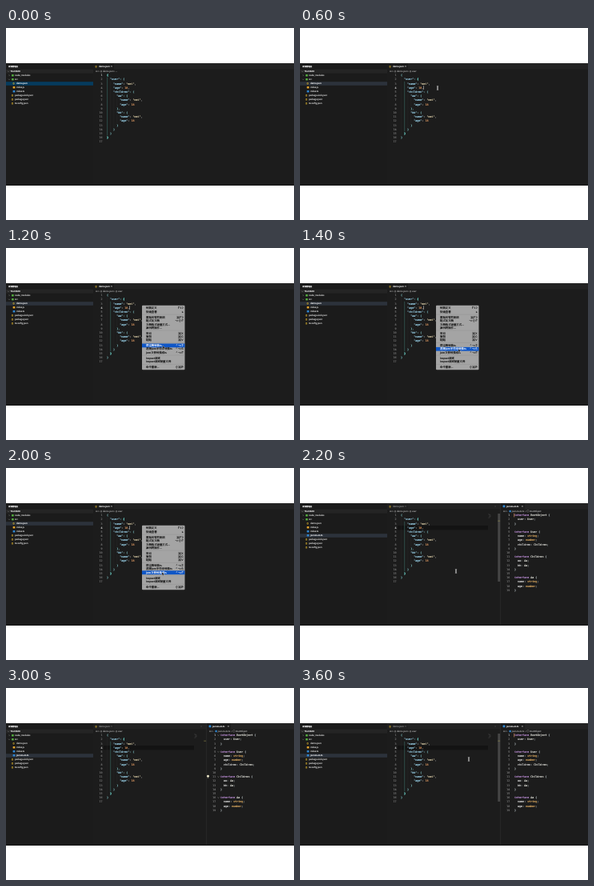
Write an HTML page that moves like this. It is 360 px wide and 240 px high and loops after 3.8 s.

```html
<!DOCTYPE html>
<html lang="zh">
<head>
<meta charset="utf-8">
<title>JSON to TS</title>
<style>
html, body { margin: 0; width: 100%; height: 100%; overflow: hidden; background: #fff; }
svg { display: block; width: 100vw; height: 100vh; }
text { white-space: pre; text-rendering: geometricPrecision; }
text, tspan { fill: currentColor; stroke: currentColor; stroke-width: .12; }
.code { font: 3.37px "DejaVu Sans Mono", monospace; }
.ui { font: 2.8px "Open Sans", "Noto Sans CJK SC", "Noto Sans CJK", sans-serif; }
.head { font: 700 2.4px "Noto Sans CJK SC", "Noto Sans CJK", sans-serif; }
.menu { font: 3.4px "Liberation Sans", "Noto Sans CJK SC", "Noto Sans CJK", "DejaVu Sans", sans-serif; }
.keys { letter-spacing: .4px; }
.bold { font-weight: 700; }
</style>
</head>
<body>
<svg id="stage" viewBox="0 0 360 240"></svg>
<script>
const STEP = 200, LOOP = 3800;
const CHAR = 2.03, ROW = 5.2, TOP = 59;
const TEAL = '#5fd6c4';
const stage = document.getElementById('stage');

const json = `{
  "user": {
    "name": "mei",
    "age": 18,
    "children": {
      "aa": {
        "name": "mei",
        "age": 18
      },
      "bb": {
        "name": "mei",
        "age": 18
      }
    }
  }
}
`.split('\n');

const types = `interface RootObject {
  user: User;
}

interface User {
  name: string;
  age: number;
  children: Children;
}

interface Children {
  aa: Aa;
  bb: Aa;
}

interface Aa {
  name: string;
  age: number;
}`.split('\n');

// label, vertical centre, shortcut
const menuItems = [
  ['转到定义', 75.3, 'F12'],
  ['快速查看', 79.8, '▸'],
  ['更改所有匹配项', 86.6, '⌘F2'],
  ['格式化文档', 91, '⌥⇧F'],
  ['文档格式设置方式...', 95.4],
  ['源代码操作...', 99.8],
  ['剪切', 106.4, '⌘X'],
  ['复制', 110.8, '⌘C'],
  ['粘贴', 115.2, '⌘V'],
  ['将注释转换ts', 121.9, '⌃⌥Z'],
  ['选择json字符串转换ts', 126.3, '⌃⌥S'],
  ['json文件转换成ts', 130.7, '⌃⌥F'],
  ['Inspect调试', 137.6],
  ['Inspect调试配置文件', 142],
  ['命令面板...', 148.8, '⇧⌘P']
];
const menuLines = [83.2, 103.1, 118.5, 134.1, 145.4];
const menuPick = { 5: 3, 6: 9, 7: 10, 8: 10, 9: 11, 10: 11 };

const pointer = {
  1: [163, 100], 2: [172, 85], 3: [172, 75],
  5: [188, 92], 6: [196, 122], 7: [198, 126], 8: [198, 127], 9: [196, 130], 10: [195, 130],
  11: [195, 129], 12: [222, 125], 13: [252, 118], 14: [284, 113],
  16: [264, 101], 17: [234, 91], 18: [211, 89]
};

const esc = s => s.replace(/&/g, '&amp;').replace(/</g, '&lt;');
const rect = (x, y, w, h, fill, more = '') =>
  `<rect x="${x}" y="${y}" width="${w}" height="${h}" fill="${fill}" ${more}/>`;
const text = (x, y, s, color, cls = 'ui', anchor = 'start') =>
  `<text x="${x}" y="${y + 1.15}" color="${color}" class="${cls}" text-anchor="${anchor}">${s}</text>`;
const label = (x, y, s, color, cls) => text(x, y, esc(s), color, cls);
const line = (d, color, w = .5) =>
  `<path d="${d}" fill="none" stroke="${color}" stroke-width="${w}"/>`;
const rowY = n => TOP + (n - 1) * ROW;

const jsonColor = (t, rest) =>
  t[0] === '"' ? (rest[0] === ':' ? '#a4e0fa' : '#e2d3ac')
  : /\d/.test(t) ? '#f2a468'
  : /[{}]/.test(t) ? '#8fdde0' : '#d4d4d4';

const typeColor = (t, rest) =>
  t === 'interface' ? '#c795e2'
  : /^(string|number)$/.test(t) ? '#efb868'
  : /^[A-Z]/.test(t) ? '#ecece4'
  : rest[0] === ':' ? '#e0e0e0' : '#ccd6da';

function codeBlock(lines, x, numX, color, active) {
  return lines.map((src, i) => {
    const body = src.trimStart(), y = rowY(i + 1);
    const spans = body.replace(/"[^"]*"|\w+|[^"\w]+/g, (t, at) =>
      `<tspan color="${color(t, body.slice(at + t.length))}">${t}</tspan>`);
    return text(numX, y, i + 1, i + 1 === active ? '#c6c6c6' : '#7c7c7c', 'code', 'end') +
      text(x + (src.length - body.length) * CHAR, y, spans, '#ccc', 'code');
  }).join('');
}

function fileIcon(x, y, kind) {
  if (kind === 'json') return text(x - 1.6, y, '{}', '#e0b72f', 'ui bold');
  const color = { js: '#e3a42b', ts: '#2f86d2', dir: '#54a83f' }[kind];
  return rect(x - 1.4, y - 1.3, 2.8, 2.6, color, 'rx=".4"');
}

function sidebar(step) {
  const split = step >= 11;
  const files = [
    ['node_modules', 'dir', 10], ['src', 'dir', 10],
    ['demo.json', 'json', 12], ['index.js', 'js', 12], ['index.ts', 'ts', 12],
    ...(split ? [['json-to-ts.ts', 'ts', 12]] : []),
    ['package-lock.json', 'json', 10], ['package.json', 'json', 10], ['tsconfig.json', 'json', 10]
  ];
  const chosen = split ? 5 : 2;
  let out = rect(0, 44, 109, 153, '#1b1b1b') + rect(0, 51.6, 109, 5.2, '#242424') +
    label(3, 47.8, '资源管理器', '#dcdcdc', 'head') +
    line('M2 53.6l1 1 1-1', '#bbb', .4) + label(5.5, 54, 'TS-DEMO', '#d0d0d0', 'ui bold');
  out += rect(0, 67.2 + (chosen - 2) * 5, 109, 4.6, step < 3 ? '#063b5e' : '#2c323b');
  files.forEach(([name, kind, indent], i) => {
    const y = 59.2 + i * 5, x = indent - 2;
    if (kind === 'dir')
      out += line(i ? `M3 ${y - .5}l1 1 1-1` : `M3.5 ${y - 1}l1 1-1 1`, '#aaa', .4);
    out += fileIcon(x + (indent === 12 ? 0 : .4), y, kind) +
      label(indent + 1, y, name, i === chosen ? '#fff' : '#dadada');
  });
  return out;
}

function tab(x, width, name, kind, active) {
  return rect(x, 44, width, 7.6, active ? '#1c1c1c' : '#202020') +
    fileIcon(x + 4, 47.9, kind) + label(x + 7, 47.8, name, active ? '#fff' : '#8c8c8c') +
    line(`M${x + width - 4} 47l1.8 1.8m0-1.8l-1.8 1.8`, active ? '#ddd' : '#666', .4);
}

function leftPane(step) {
  const split = step >= 11, clicked = step >= 3, end = split ? 250.5 : 360;
  const [openRow, closeRow, guideX] = clicked ? [2, 15, 126 + 2 * CHAR] : [1, 16, 126];
  const at = pointer[step];
  let out = rect(109, 44, end - 109, 7.6, '#232323') + tab(109, 26, 'demo.json', 'json', !split) +
    label(112, 54, clicked ? 'src › {} demo.json › {} user' : 'src › {} demo.json › ...', '#a0a0a0');
  if (split) out += rect(122, rowY(4) - 2.6, 113, 5.2, '#131313');
  [[0, 2, 16], [2, 3, 15], [4, 6, 14], [6, 7, 9], [6, 11, 13]].forEach(([col, a, b]) =>
    out += line(`M${126.6 + col * CHAR} ${rowY(a) - 2.6}V${rowY(b) - 2.6}`, '#343434', .3));
  out += line(`M${guideX + .6} ${rowY(openRow + 1) - 2.6}V${rowY(closeRow) - 2.6}`, '#3d8078', .45) +
    codeBlock(json, 126, 120.5, jsonColor, clicked ? 4 : 1) +
    text(guideX, rowY(closeRow), '}', TEAL, 'code bold') +
    text(guideX + (clicked ? 8 * CHAR : 0), rowY(openRow), '{', TEAL, 'code bold');
  if (clicked && !split) out += rect(126 + 14 * CHAR, rowY(4) - 2.4, .5, 4.8, '#e8e8e8');
  if (split) {
    for (let i = 0; i < 8; i++)
      out += rect(235 + 1.4 * Math.sin(i / 7 * Math.PI), 57.4 + i * .65, 2.4, .3, '#474747');
    if (at && at[0] < 250) out += rect(247.3, 57, 3, 85, '#464646');
    out += rect(247.3, 65.8, 3, .6, '#96904c') + text(243, 47.5, '···', '#777');
  }
  return out;
}

function rightPane(step) {
  const hover = step >= 13 && step <= 16;
  let out = rect(250.5, 44, 109.5, 153, '#1c1c1c') + rect(250.5, 44, 109.5, 7.6, '#232323') +
    line('M250.6 44V197', '#3a3a3a', .4) +
    tab(251, 30, 'json-to-ts.ts', 'ts', true) +
    label(254, 54, 'src ›', '#a0a0a0') + rect(261.5, 52.9, 2.2, 2.3, '#2f86d2') +
    label(264.8, 54, 'json-to-ts.ts › •○ RootObject', '#a0a0a0') +
    codeBlock(types, 268, 262.3, typeColor, 1);
  if (hover) {
    for (const n of [1, 5, 11, 16])
      out += line(`M264.5 ${rowY(n) - .5}l1 1 1-1`, '#aaa', .4);
    out += `<circle cx="252.5" cy="110.2" r="1.4" fill="#f3efcf"/>` + rect(251.9, 111.5, 1.2, .9, '#d8d5bd');
  }
  if (step !== 15) out += rect(267.5, rowY(1) - 2.4, .6, 4.8, '#eda066');
  return out;
}

function menu(step) {
  let out = rect(170, 71.7, 53.5, 80.6, '#a4a4a4', 'rx="1"');
  menuLines.forEach(y => out += line(`M170 ${y}H223.5`, '#8e8e8e', .4));
  menuItems.forEach(([name, y, key], i) => {
    const on = menuPick[step] === i, color = on ? '#fff' : '#0c0c0c';
    if (on) out += rect(170, y - 2.4, 53.5, 4.8, '#0f56c6');
    out += label(175, y, name, color, 'menu');
    if (key) out += text(222, y, key, color, 'menu keys', 'end');
  });
  return out;
}

function cursor(step) {
  const at = pointer[step];
  if (!at) return '';
  const [x, y] = at;
  return step >= 4 && step <= 10
    ? `<path d="M${x} ${y}v4.2l1-.9.7 1.6.7-.3-.7-1.5h1.3z" fill="#111" stroke="#eee" stroke-width=".3"/>`
    : line(`M${x - 1.1} ${y - 2.4}q1.1 0 1.1 .7v3.4q0 .7-1.1 .7m2.2-4.8q-1.1 0-1.1 .7v3.4q0 .7 1.1 .7`, '#eee', .6);
}

function draw(step) {
  const split = step >= 11;
  stage.innerHTML = rect(0, 0, 360, 240, '#fff') + rect(0, 44, 360, 153, '#1c1c1c') +
    sidebar(step) + leftPane(step) + (split ? rightPane(step) : '') +
    rect(0, 195.8, 360, 1.2, '#151515') +
    (step >= 4 && !split ? menu(step) : '') + cursor(step);
}

let shown = -1;
const start = performance.now();
function tick() {
  const step = Math.floor((performance.now() - start) % LOOP / STEP);
  if (step !== shown) draw(shown = step);
  requestAnimationFrame(tick);
}
tick();
</script>
</body>
</html>
```
